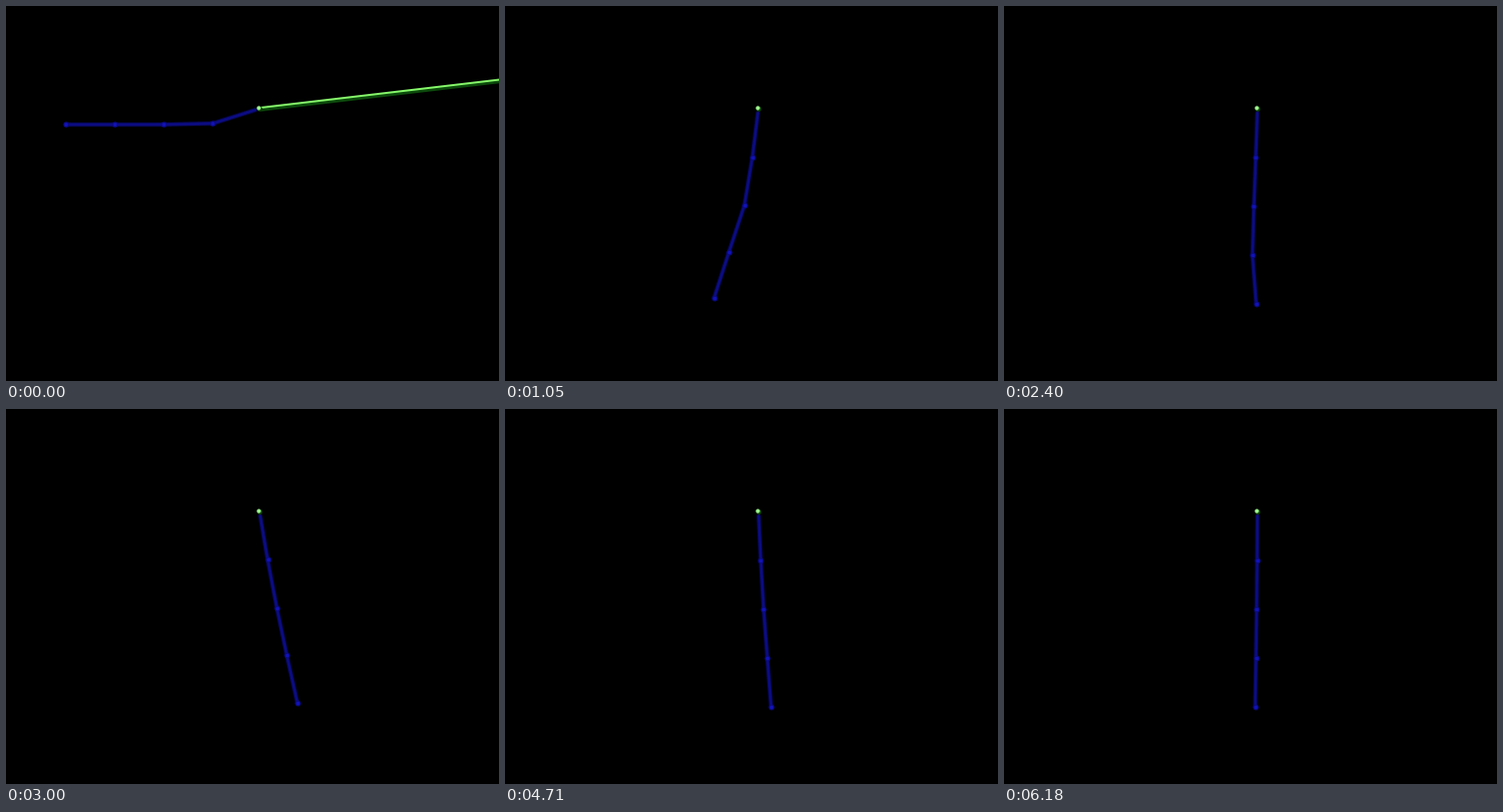
These frames come from a looping animation (504x384 px, 6.21 s). A matplotlib script:

```python
import numpy as np
import matplotlib.pyplot as plt
from matplotlib.animation import FuncAnimation

W, H, DPI = 504, 384, 100
FRAMES, INTERVAL = 207, 30
PIVOT = np.array([258.6, 104.6])

# Chain of equal point masses on rigid links; time is counted in frames.
N, LINK = 4, 50.0
GRAVITY = 7.6 / LINK
DRAG = 0.0395
LEAD, SUBSTEPS = 2.1, 12

idx = np.arange(N)
CARRIED = N - np.maximum.outer(idx, idx)


def rates(state):
    angle, spin = state
    gap = angle[:, None] - angle
    mass = CARRIED * np.cos(gap)
    torque = (-(CARRIED * np.sin(gap)) @ spin**2
              - (N - idx) * GRAVITY * np.sin(angle)
              - DRAG * mass @ spin)
    return np.array([spin, np.linalg.solve(mass, torque)])


def advance(state, span):
    h = span / SUBSTEPS
    for _ in range(SUBSTEPS):
        a = rates(state)
        b = rates(state + h / 2 * a)
        c = rates(state + h / 2 * b)
        d = rates(state + h * c)
        state = state + h / 6 * (a + 2 * b + 2 * c + d)
    return state


def simulate():
    state = np.array([np.full(N, -np.pi / 2), np.zeros(N)])
    state = advance(state, LEAD)
    poses = []
    for _ in range(FRAMES):
        steps = LINK * np.column_stack([np.sin(state[0]), np.cos(state[0])])
        poses.append(PIVOT + np.cumsum(steps, axis=0))
        state = advance(state, 1)
    return poses


poses = simulate()

fig = plt.figure(figsize=(W / DPI, H / DPI), dpi=DPI, facecolor="black")
ax = fig.add_axes([0, 0, 1, 1])
ax.set_xlim(-0.5, W - 0.5)
ax.set_ylim(H - 0.5, -0.5)
ax.axis("off")


def px(size):
    return size * 72 / DPI


def stroke(color, width, z, xs=(), ys=()):
    return ax.plot(xs, ys, color=color, lw=px(width), zorder=z, snap=False,
                   solid_capstyle="round", solid_joinstyle="round")[0]


def dots(color, size, z, xs=(), ys=()):
    return ax.plot(xs, ys, "o", color=color, ms=px(size), mew=0, zorder=z,
                   snap=False)[0]


chain = [stroke("#060648", 4.6, 1), stroke("#0c0c84", 2.6, 2)]
joints = [dots("#0a0a80", 6, 3), dots("#1212b8", 3.6, 4)]

ray = [stroke("#0c4a0c", 3.4, 5, (259, 512), (105.8, 76)),
       stroke("#86fa6a", 2, 6, (258, 512), (103.8, 74))]

dots("#0c3c0a", 5.4, 7, [258.4], [104.8])
dots("#9cf68c", 4.2, 8, [257.7], [103.7])


def draw(n):
    nodes = poses[n]
    start = PIVOT + 0.09 * (nodes[0] - PIVOT)
    path = np.vstack([start, nodes])
    for line in chain:
        line.set_data(path[:, 0], path[:, 1])
    for mark in joints:
        mark.set_data(nodes[:, 0], nodes[:, 1])
    for line in ray:
        line.set_visible(n == 0)
    return chain + joints + ray


anim = FuncAnimation(fig, draw, frames=FRAMES, interval=INTERVAL,
                     repeat=True, repeat_delay=0, blit=False)
plt.show()
```
